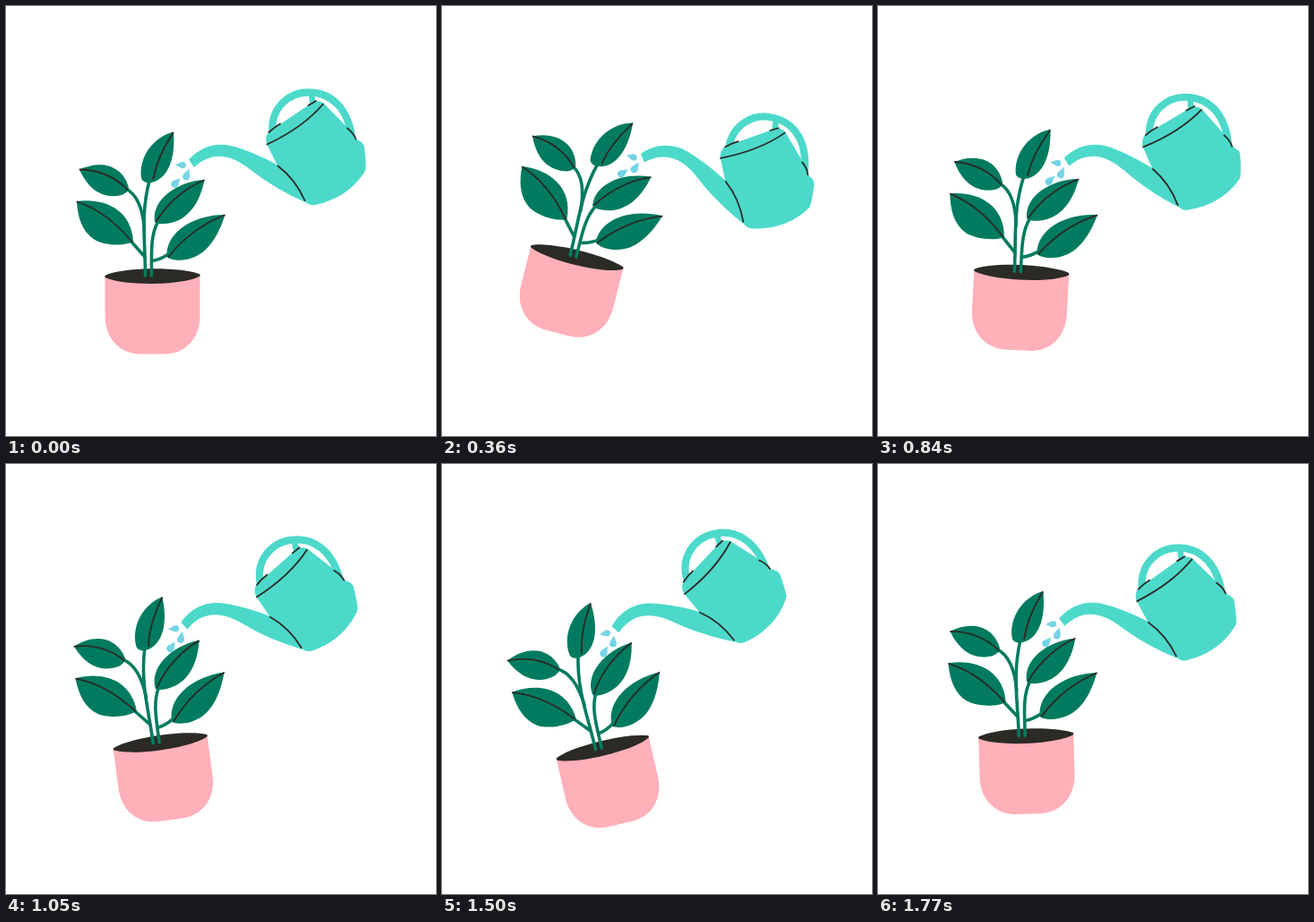
These frames come from a looping animation (480 by 480 pixels, 1.8 s). An HTML page:

```html
<!DOCTYPE html>
<html lang="en">
<head>
<meta charset="utf-8">
<title>Watering a plant</title>
<style>
  html, body { margin: 0; width: 100%; height: 100%; overflow: hidden; background: #fff; }
  svg { display: block; width: 100%; height: 100%; }
  .line { fill: none; stroke-linecap: round; stroke-linejoin: round; }
  .stem { stroke: #007b5f; stroke-width: 3.6; }
  .ink { stroke: #2b2a25; stroke-width: 1.8; }
  .handle { stroke: #4cd9ca; stroke-width: 8.2; stroke-linecap: butt; }
  .leaf { fill: #007b5f; }
  .can { fill: #4cd9ca; }
  .pot { fill: #ffb0b9; }
  .soil { fill: #2b2a25; }
  .drop { fill: #74d4e6; }
</style>
</head>
<body>
<svg viewBox="0 0 480 480">
  <defs>
    <path id="drop" d="M0 -7C1 -3.5 4 -.5 4 2.8C4 5.2 2.2 6.6 0 6.6S-4 5.2 -4 2.8C-4 -.5 -1 -3.5 0 -7Z"/>
  </defs>
  <g id="scene">
    <g class="drop">
      <use href="#drop" transform="translate(195 177.5) rotate(-88) scale(.9)"/>
      <use href="#drop" transform="translate(202 188) rotate(20)"/>
      <use href="#drop" transform="translate(190 197) rotate(43)"/>
    </g>

    <path class="pot" d="M110.5 302V346C110.5 372 128 388.5 150 388.5H177C199 388.5 216.5 372 216.5 346V300Z"/>
    <path class="soil" d="M110.5 301C130 291 197 291 216.5 299.5V301.5C197 312.5 130 312.5 110.5 303Z"/>

    <g class="line stem">
      <path d="M155.500 301C155.500 262 150 234 160 195"/>
      <path d="M162.500 301C162.500 275 161 256 170 240"/>
      <path d="M134 204C147 211 153 228 154.500 250"/>
      <path d="M139 262L154.500 279.500"/>
      <path d="M163 284.500C171 283.500 177 280 183 276"/>
    </g>

    <g class="leaf">
      <path d="M187 140.500C165 146 148 168 151 192C152 196 157 198 162 197C176 195 190 178 187 140.500Z"/>
      <path d="M82 182.500C104 172 130 176 137 203C137 206 134 209 129 211C108 216 92 205 82 182.500Z"/>
      <path d="M79 218C108 214 140 226 142 263C133 268 112 268 99 261C85 252 80 236 79 218Z"/>
      <path d="M221.500 194C190 196 162 217 166 241C168 244 178 244 188 241C206 235 217 217 221.500 194Z"/>
      <path d="M244.500 233C210 233 178 252 179.500 280C184 284.500 199 285 208 281C224 276 237 258 244.500 233Z"/>
    </g>
    <g class="line ink">
      <path d="M186.500 141.500C177 156 168 172 164.500 193"/>
      <path d="M82.500 182.500C103 183 122 191 135.500 205"/>
      <path d="M79.500 218.500C102 226 123 242 140.500 263"/>
      <path d="M221 194.500C203 202 182 217 168 240"/>
      <path d="M244 233.500C222 242 199 258 181.500 280"/>
    </g>

    <g class="line handle">
      <path d="M297.500 142C295 113 316 96.300 338 96.300C363 96.300 382 114 386.500 149"/>
      <path d="M341 97L342.500 112" stroke-width="6.500"/>
    </g>
    <path class="can" d="M204 171.500C220 154 240 151 260 158.500C278 164.500 291 171 304 178L336 195L334 219C314 210 292 198 272 182C250 165 230 162 210 180Z"/>
    <path class="can" d="M291 154C289 148 291 142 294 140L338 110.500C343 107 349 104 355 109L382 136.500L391 148.500C397 152 399 153 400 157C401 166 402 174 401.500 183C390 203 370 217 345 222C340 223 337 221 333 218C326 200 316 188 303 178Z"/>
    <g class="line ink">
      <path d="M291.500 154.500C315 143.500 338 128 354 109.500"/>
      <path d="M293.500 141C297 137.500 301 134.500 306 131.500"/>
      <path d="M337.500 111L346 106"/>
      <path d="M381 136.500C385 139.500 388.500 143.500 390.500 148.500"/>
      <path d="M303.500 178.500C316 188 326 200 333.500 217"/>
    </g>
  </g>
</svg>
<script>
  const LOOP = 1800, STEP = 30, SWING = 15;
  const scene = document.getElementById('scene');

  // The whole scene rocks about the centre in 30 ms steps, following a sine.
  function draw() {
    const t = Math.floor((performance.now() % LOOP + 0.5) / STEP) * STEP;
    const angle = SWING * Math.sin(2 * Math.PI * t / LOOP);
    scene.setAttribute('transform', `rotate(${angle.toFixed(3)} 240 240)`);
    requestAnimationFrame(draw);
  }
  draw();
</script>
</body>
</html>
```
